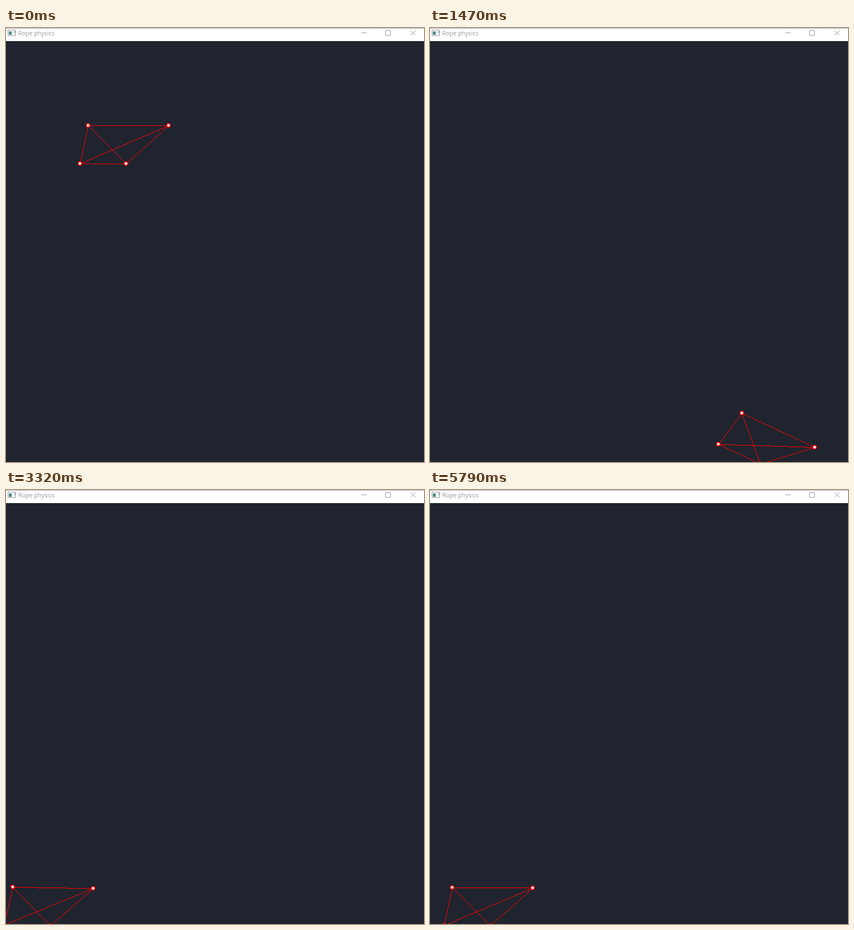
An HTML page for the animation above (5.89 s loop, 735 by 762 pixels).

```html
<!DOCTYPE html>
<html lang="en">
<head>
<meta charset="utf-8">
<title>Rope physics</title>
<style>
  html, body { margin: 0; width: 100%; height: 100%; overflow: hidden; background: #20242e; }
  svg { display: block; }
  text { font: 10.5px "Open Sans", "Noto Sans", sans-serif; fill: #999; }
  .links { stroke: #f00; stroke-width: 1; fill: none; shape-rendering: crispEdges; }
  .joint { fill: #fff; stroke: #f00; stroke-width: 1.6; }
  .button { fill: none; stroke: #999; stroke-width: 1; }
</style>
</head>
<body>
<svg width="735" height="762" viewBox="0 0 735 762">
  <rect width="735" height="762" fill="#20242e"/>
  <g id="body"></g>
  <g id="titlebar">
    <rect width="735" height="23" fill="#fff"/>
    <rect width="735" height="1" fill="#a9a9a9"/>
    <rect x="3.5" y="3.5" width="13" height="10" fill="#f4f4f4" stroke="#a5a5a5"/>
    <rect x="5" y="6" width="5" height="6" fill="#4b8f8a"/>
    <rect x="15" y="5" width="1" height="4" fill="#8a8a8a"/>
    <text x="21.5" y="13.3">Rope physics</text>
    <path class="button" d="M624.5 8.5h9M667.5 4.5h8.5v8.5h-8.5z"/>
    <path class="button" d="M711.5 4.5l8.5 8.5M720 4.5l-8.5 8.5"/>
  </g>
</svg>
<script>
const LOOP = 5890, FLOOR = 765;
const LAUNCH = 105, CEILING_HIT = 235, RIGHT_WALL_HIT = 975, TIP_OVER = 2030, LEFT_WALL_HIT = 3140;

// Corners relative to the centre of mass
const corners = [[-48.5, -33.5], [93, -33.5], [18.25, 33.5], [-62.75, 33.5]];
const pairs = [[0, 1], [1, 2], [2, 3], [3, 0], [0, 2], [1, 3]];
const PIVOT = 2;

// [time, x] of the pivot corner between changes of sliding speed
const slide = [
  [RIGHT_WALL_HIT, 719], [1300, 655], [TIP_OVER, 336], [3075, 77.5],
  [3320, 77.3], [4380, 91.5], [5790, 105.3]
];

function slideX(t) {
  const i = slide.findIndex(k => k[0] >= t);
  if (i < 0) return slide[slide.length - 1][1];
  const [t0, a] = slide[i - 1], [t1, b] = slide[i];
  return a + (b - a) * (t - t0) / (t1 - t0);
}

// Thrown upwards, bouncing off the ceiling, then falling
function flightY(t) {
  if (t < CEILING_HIT) {
    const s = Math.max(0, t - LAUNCH);
    return 204.5 - 0.69 * s + 0.0004 * s * s;
  }
  const s = t - CEILING_HIT;
  return 121.6 + 0.2523 * s + 0.000418 * s * s;
}

// Tilt in degrees: free spin, roll after the wall, tip back like a pendulum, damped wobble
function tilt(t) {
  if (t < RIGHT_WALL_HIT) return -0.5333 * Math.max(0, t - LAUNCH);
  const left = Math.max(0, 1 - (t - RIGHT_WALL_HIT) / 600);
  const roll = 42 - 146 * left ** 1.23;
  const grow = Math.exp(0.003 * (t - TIP_OVER));
  const tip = 28.6 + 5.76 / grow - 2.86 * grow;
  if (t < TIP_OVER) return Math.min(roll, tip);
  const s = Math.max(0, t - LEFT_WALL_HIT);
  return Math.max(0.3, tip) - 5.5 * Math.exp(-s / 100) * Math.sin(2 * Math.PI * s / 280);
}

function pose(t) {
  const angle = tilt(t) * Math.PI / 180;
  const c = Math.cos(angle), s = Math.sin(angle);
  const turned = corners.map(([x, y]) => [x * c - y * s, x * s + y * c]);
  const restY = FLOOR - Math.max(...turned.map(p => p[1]));
  const cy = Math.min(flightY(t), restY);
  const cx = t < RIGHT_WALL_HIT
    ? 192.75 + 0.572 * Math.max(0, t - LAUNCH)
    : slideX(t) - turned[PIVOT][0];
  return turned.map(([x, y]) => [cx + x, cy + y]);
}

// One pixel per step along the longer axis, without smoothing
function pixelLine([x0, y0], [x1, y1]) {
  const steps = Math.ceil(Math.max(Math.abs(x1 - x0), Math.abs(y1 - y0)));
  let d = "";
  for (let i = 0; i <= steps; i++) {
    const x = Math.round(x0 + (x1 - x0) * i / steps);
    const y = Math.round(y0 + (y1 - y0) * i / steps);
    d += `M${x} ${y + 0.5}h1`;
  }
  return d;
}

function set(node, attrs) {
  for (const name in attrs) node.setAttribute(name, attrs[name]);
}

function add(tag, attrs) {
  const node = document.createElementNS("http://www.w3.org/2000/svg", tag);
  set(node, attrs);
  return document.getElementById("body").appendChild(node);
}

const links = add("path", { class: "links" });
const joints = corners.map(() => add("circle", { class: "joint", r: 3.2 }));

function draw(t) {
  const points = pose(t);
  set(links, { d: pairs.map(([a, b]) => pixelLine(points[a], points[b])).join("") });
  points.forEach(([cx, cy], i) => set(joints[i], { cx, cy }));
}

const begin = performance.now();
function tick() {
  draw(Math.min((performance.now() - begin) % LOOP, 5790));
  requestAnimationFrame(tick);
}
tick();
</script>
</body>
</html>
```
